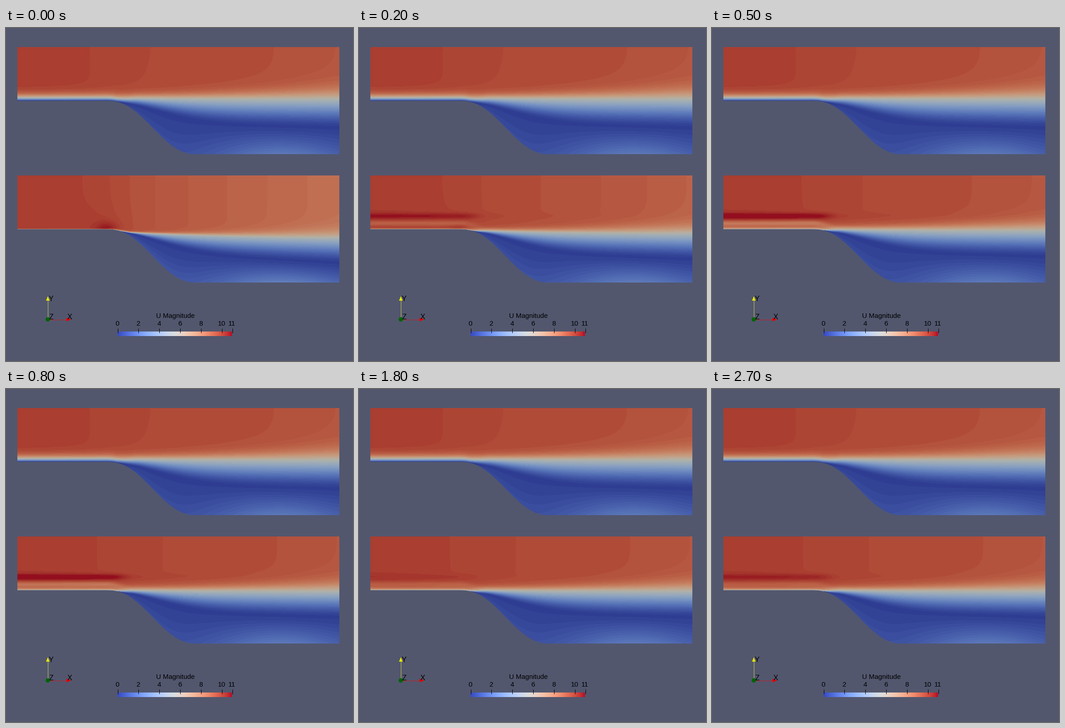
A matplotlib script for the animation above (3.1 s loop, 763 by 734 pixels).

```python
import numpy as np
import matplotlib.pyplot as plt
from matplotlib.animation import FuncAnimation
from matplotlib.colors import ListedColormap
from matplotlib.patches import Circle, Polygon

W, H, DPI = 763, 734, 100
LEFT, RIGHT, CORNER = 25, 733, 215
STEP, DEPTH = 118.5, 236
STEP_MS, FRAMES = 100, 31
BG = (82 / 255, 87 / 255, 110 / 255)
U_MAX = 11

BASE = plt.get_cmap("coolwarm")(np.arange(64) / 64)[:, :3]
BAR = ListedColormap(BASE)
SHADED = ListedColormap(BASE * [0.8, 0.8, 0.755])   # lit by a warm lamp

plt.rcParams["font.family"] = "Liberation Sans"

X = np.arange(LEFT, RIGHT) + 0.5
Y = (np.arange(DEPTH) + 0.5)[:, None] - STEP     # 0 at the inlet floor, down is positive
G = np.clip((X - CORNER) / (RIGHT - CORNER), 0, 1)


def ramp(x, a, b):
    s = np.clip((x - a) / (b - a), 0, 1)
    return s**3 * (10 - 15 * s + 6 * s * s)


def bump(v, centre, width):
    return np.exp(-((v - centre) / width)**2)


WALL = STEP * ramp(X, CORNER, 430)

# sink: fall of the zero line; mid: start and drop of the layer's centre;
# thick: start and growth of its upper half; free: outer speed and its losses
UPPER = dict(sink=13, mid=(-7.5, 5.5), thick=(14, 24),
             free=(10.1, .33, .33, 2.5), back=.5)
START = dict(sink=28, mid=(-1, 24), thick=(2, 28),
             free=(10.13, .5, 1.0, 1), back=.75)
FINAL = dict(sink=12, mid=(-1.5, 4), thick=(12, 22),
             free=(10.13, .33, .3, 2.5), back=.5)

# Strength of the inlet jet and of the slow band under it
KEY_MS = [0, 200, 300, 800, 1000, 1300, 1800, 1900]
JET = [0, .8, 1.2, 1.2, .35, .35, .2, .65]
DIP = [0, .95, 1.8, 1.4, .5, .5, .7, .7]


def outer(flow, g, x):
    top, loss, drop, power = flow["free"]
    return top - loss / (1 + np.exp((205 - x) / 50)) - drop * g**power


def shear(flow, free):
    """Zero line and speed of the separated flow behind the corner."""
    zero = 46 * (1 - np.exp(-(G / .31)**2)) + flow["sink"] * G
    zero = np.minimum(zero, WALL)
    mid = flow["mid"][0] + flow["mid"][1] * np.sqrt(G)
    mid = np.minimum(mid, zero - 1.5)
    thick = flow["thick"][0] + flow["thick"][1] * G**1.5

    low = 0.55 * np.clip((zero - Y) / (zero - mid), 0, 1)**1.38
    high = 0.45 * np.tanh(1.42 * np.maximum(mid - Y, 0) / thick)
    q = np.clip((Y - zero) / (WALL - zero + 1), 0, 1)
    back = flow["back"] + 1.6 * bump(X, 605, 145)
    return zero, np.hypot(free * (low + high) + back * q**1.1, 0.15)


def upper_field():
    depth = np.clip(1 + Y / STEP, 0, 1)
    x = X + 50 * depth**2 * ramp(X, 200, 260)
    free = outer(UPPER, np.clip((x - CORNER) / (RIGHT - CORNER), 0, 1), x)
    zero, u = shear(UPPER, free)
    inlet = free * np.tanh(np.maximum(zero - Y, 0) / 12)
    w = ramp(X, 210, 300)
    return (1 - w) * inlet + w * u


def mix(a, b, p):
    return {k: (1 - p) * np.array(a[k]) + p * np.array(b[k]) for k in a}


def lower_field(ms):
    p = 1 - np.exp(-(min(ms, 600) / 260)**1.2)
    flow = mix(START, FINAL, p)
    free = outer(flow, G, X)
    zero, u = shear(flow, free)

    jet = np.interp(ms, KEY_MS, JET) * bump(-Y, 29, 7)
    d = np.maximum(zero - Y, 0)
    skin = 4.7 * np.exp(-d / (0.5 + 4.2 * p**3))
    inlet = free + jet - skin - np.interp(ms, KEY_MS, DIP) * bump(d, 13, 6)
    inlet = np.where(Y > zero, u, inlet)
    fade = 0.9 * np.exp(-20 * G**1.1) + 0.1 * np.exp(-2 * G)
    w = ramp(X, 212, 290)
    u = (1 - w) * inlet + w * (u + fade * jet)

    # Suction peak over the corner
    peak = 0.9 * bump(X, 222, 24) * bump(Y, 0, 16)
    peak = peak + 0.15 * bump(X, 200, 60) * bump(Y, 0, 45)
    return u + (1 - p) * peak * (Y < zero)


fig = plt.figure(figsize=(W / DPI, H / DPI), dpi=DPI, facecolor=BG)
ax = fig.add_axes([0, 0, 1, 1])


def panel(top, data):
    im = ax.imshow(data, cmap=SHADED, vmin=0, vmax=U_MAX, aspect="auto",
                   interpolation="nearest",
                   extent=(LEFT, RIGHT, top + DEPTH, top))
    edge = np.column_stack([X, top + STEP + WALL])[X < 431]
    pts = [(LEFT - 1, top + STEP), *edge, (431, top + DEPTH + 1),
           (LEFT - 1, top + DEPTH + 1)]
    ax.add_patch(Polygon(pts, fc=BG, ec="none", zorder=2))
    return im


def label(x, y, s, px=15):
    ax.text(x, y, s, fontsize=px * 72 / DPI, ha="center", va="baseline",
            color="black", zorder=6)


def line(xs, ys, color):
    ax.plot(xs, ys, color=color, lw=72 / DPI, solid_capstyle="butt", zorder=4)


def shape(pts, color):
    ax.add_patch(Polygon(pts, fc=color, ec="none", zorder=5))


panel(42, upper_field())
lower = panel(325, lower_field(0))

# Colour bar
ax.imshow(np.linspace(0, 1, 252)[None], cmap=BAR, aspect="auto",
          interpolation="nearest", extent=(245, 497, 679, 669))
for v in (0, 2, 4, 6, 8, 10, 11):
    x = 245 + 252 * v / U_MAX
    line([int(x) + .5] * 2, [662, 672], "black")
    label(x, 656.5, str(v))
label(372.5, 639, "U Magnitude")

# Axis marker
line([91.5, 91.5], [640, 600], "#c8c84a")
line([92, 134], [642.5, 642.5], "#c81e1e")
shape([(92, 591), (88, 601), (96, 601)], "#e6e600")
shape([(143.5, 642.5), (133, 638.5), (133, 646.5)], "#e60000")
ax.add_patch(Circle((92, 642.3), 4.8, fc="#006400", ec="none", zorder=5))
for x, y, s in ((98.5, 602, "Y"), (99.5, 642.5, "Z"), (139.5, 642.5, "X")):
    label(x, y, s, 16)

ax.set_xlim(0, W)
ax.set_ylim(H, 0)
ax.axis("off")


def draw(i):
    lower.set_data(lower_field(i * STEP_MS))
    return [lower]


anim = FuncAnimation(fig, draw, frames=FRAMES, interval=STEP_MS,
                     init_func=lambda: draw(0), repeat=True, repeat_delay=0)
plt.show()
```
